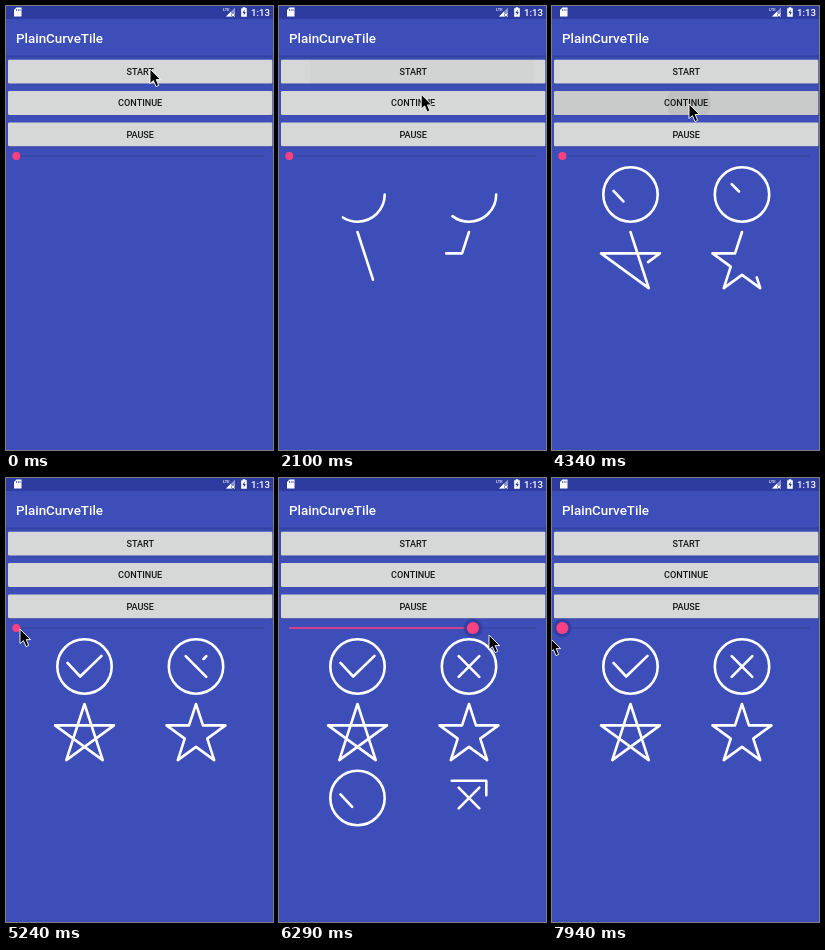
An HTML page for the animation above (8000 ms loop, 267x444 px).

```html
<!DOCTYPE html>
<html lang="en">
<head>
<meta charset="utf-8">
<title>Line drawing demo</title>
<style>
  html, body { margin: 0; width: 100%; height: 100%; overflow: hidden; background: #3d4eb8; }
  svg { display: block; width: 100%; height: 100%; }
  text { font-family: Roboto, "Noto Sans", sans-serif; font-weight: 500; }
  #buttons text { font-size: 9.1px; text-anchor: middle; fill: #151515; }
  #shapes path { fill: none; stroke: #fff; stroke-width: 2.6; stroke-linecap: round; stroke-linejoin: round; }
</style>
</head>
<body>
<svg id="stage" viewBox="0 0 267 444">
  <defs>
    <linearGradient id="shade" x2="0" y2="1">
      <stop stop-color="#2c3a92" stop-opacity=".75"/>
      <stop offset="1" stop-color="#2c3a92" stop-opacity="0"/>
    </linearGradient>
  </defs>
  <rect width="267" height="444" fill="#3d4eb8"/>
  <rect y="49.5" width="267" height="4" fill="url(#shade)"/>
  <rect width="267" height="13" fill="#2e3ca0"/>

  <g id="status" fill="#fff">
    <path d="M10.5 1.5H15.5V10.5H8V4Z"/>
    <path d="M10.5 3v2M12.3 3v2M14 3v2" stroke="#2e3ca0" stroke-width=".7"/>
    <path d="M229 1.5V10.5H220Z" fill-opacity=".45"/>
    <path d="M225 5.5V10.5H220Z"/>
    <path d="M225.5 7.5l3 3m0-3l-3 3" stroke="#fff" stroke-width=".9"/>
    <text x="217" y="5" font-size="4">LTE</text>
    <path d="M236.7 1.3h2.6v1h1.5v8.4h-5.6V2.3h1.5Z"/>
    <path d="M238.5 3.5l-2 3.4h1.3v2.6l2-3.5h-1.3Z" fill="#2e3ca0"/>
    <text x="245" y="9.8" font-size="9.6">1:13</text>
  </g>
  <text x="10" y="36.8" font-size="13.4" fill="#fff">PlainCurveTile</text>

  <g id="buttons"></g>
  <path d="M10 150H258" stroke="#3443a0"/>
  <path id="filled" stroke="#ff4081" stroke-width="1.4"/>
  <circle id="halo" cy="150" r="9.3" fill="#2f3c9c" fill-opacity=".75"/>
  <circle id="thumb" cy="150" fill="#ff4081"/>
  <g id="shapes"></g>
  <path id="cursor" d="M0 0V14.6L3.4 11.6L6 17.6L8.7 16.4L6.2 10.6H10.6Z" fill="#000" stroke="#fff" stroke-width=".9"/>
</svg>
<script>
const LOOP = 8000;
const $ = id => document.getElementById(id);
const clamp = (v, lo = 0, hi = 1) => Math.min(hi, Math.max(lo, v));

function add(parent, tag, attrs) {
  const node = document.createElementNS("http://www.w3.org/2000/svg", tag);
  set(node, attrs);
  return parent.appendChild(node);
}
function set(node, attrs) {
  for (const key in attrs) node.setAttribute(key, attrs[key]);
}

// Buttons with a press ripple; `wash` also darkens the whole button.
const buttons = [
  { label: "START", y: 53.7, press: 1650, x: 143, wash: 0 },
  { label: "CONTINUE", y: 85.1, press: 4340, x: 137, wash: .06 },
  { label: "PAUSE", y: 116.4, press: 2990, x: 141, wash: .06 }
].map((b, i) => {
  const group = $("buttons");
  const box = { x: 2, y: b.y, width: 264.3, height: 23.8, rx: 1.2 };
  add(add($("stage"), "clipPath", { id: "clip" + i }), "rect", box);
  add(group, "rect", { ...box, y: b.y + .7, fill: "#2c3a92", "fill-opacity": .6 });
  add(group, "rect", { ...box, fill: "#d6d7d7" });
  const wash = add(group, "rect", box);
  const ripple = add(group, "circle", { cx: b.x, cy: b.y + 12, "clip-path": `url(#clip${i})` });
  add(group, "text", { x: 134.2, y: b.y + 15.3 }).textContent = b.label;
  return { ...b, wash, ripple, depth: b.wash };
});

// Path builders, all centred on (x, y)
const poly = (points, close) =>
  "M" + points.map(p => p.map(v => v.toFixed(2)).join(" ")).join("L") + (close ? "Z" : "");
const circle = (x, y, r = 27.2) => `M${x + r} ${y}A${r} ${r} 0 1 1 ${x - r} ${y}A${r} ${r} 0 1 1 ${x + r} ${y}`;
const tick = (x, y) => poly([[x - 17, y - 3.6], [x - 4.3, y + 10], [x + 17, y - 10.6]]);
const slash = (x, y, side) => poly([[x - 10.3 * side, y - 10.3], [x + 10.3 * side, y + 10.3]]);
const square = (x, y, h = 17.3) => poly([[x - h, y - h], [x + h, y - h], [x + h, y + h], [x - h, y + h]], true);
function star(x, y, count, turn, inner) {
  return poly(Array.from({ length: count }, (_, i) => {
    const r = i % 2 ? 31 * inner : 31, a = -Math.PI / 2 - i * turn;
    return [x + r * Math.cos(a), y + r * Math.sin(a)];
  }), true);
}

const LEFT = 78.5, RIGHT = 190;
const strokes = [];
// Each stroke is drawn while the chosen progress goes from `from` to `to`.
function stroke(d, source, from, to) {
  strokes.push({ node: add($("shapes"), "path", { d, pathLength: 1 }), source, from, to });
}
stroke(circle(LEFT, 188.5), "elapsed", 0, 1000);
stroke(tick(LEFT, 188.5), "elapsed", 1000, 2000);
stroke(circle(RIGHT, 188.5), "elapsed", 0, 960);
stroke(slash(RIGHT, 188.5, 1), "elapsed", 960, 1920);
stroke(slash(RIGHT, 188.5, -1), "elapsed", 1920, 2880);
stroke(star(LEFT, 257, 5, Math.PI * 4 / 5 * -1, 1), "elapsed", 0, 2000);
stroke(star(RIGHT, 257, 10, Math.PI / 5, .382), "elapsed", 0, 2000);
stroke(circle(LEFT, 320), "slider", 0, .6);
stroke(tick(LEFT, 320), "slider", .6, 1);
stroke(slash(RIGHT, 320, 1), "slider", 0, .3);
stroke(slash(RIGHT, 320, -1), "slider", .3, .6);
stroke(square(RIGHT, 320), "slider", .6, 1);

const cursorKeys = [
  [0, 144, 63], [1499, 144, 63], [1500, 143, 63], [1800, 143, 64], [2540, 141, 124], [2690, 141, 126],
  [3140, 141, 126], [3590, 137, 98], [4490, 137, 98], [5240, 14, 151], [5390, 17, 151],
  [6290, 210, 157], [6440, 240, 158], [6590, 262, 160], [6890, 262, 160], [7940, -2, 160]
];
const sliderKeys = [
  [5390, 0], [5540, .07], [6290, .742], [6440, .87], [6590, 1], [6890, 1], [7790, .08], [7940, 0]
];
function track(keys, t) {
  const i = keys.findIndex(k => k[0] > t);
  if (i === 0) return keys[0].slice(1);
  if (i < 0) return keys[keys.length - 1].slice(1);
  const a = keys[i - 1], b = keys[i], f = (t - a[0]) / (b[0] - a[0]);
  return a.slice(1).map((v, n) => v + (b[n + 1] - v) * f);
}

function draw(time) {
  // The picture advances in steps of 150 ms.
  const shift = time < 2540 ? 0 : 140;
  const t = time >= 2400 && time < 2540 ? 2400 : Math.floor((time - shift) / 150) * 150 + shift;

  const [slider] = track(sliderKeys, t);
  const elapsed = clamp(t - 1760, 0, 1300) + Math.max(0, t - 4490);
  const progress = { elapsed, slider };
  for (const s of strokes) {
    const p = clamp((progress[s.source] - s.from) / (s.to - s.from));
    set(s.node, {
      visibility: p > 0 ? "visible" : "hidden",
      "stroke-dasharray": p < 1 ? `${p} 2` : "none"
    });
  }

  for (const b of buttons) {
    const age = t - b.press;
    const fade = age < 0 ? 0 : clamp((600 - age) / 350);
    set(b.wash, { "fill-opacity": b.depth * fade });
    set(b.ripple, { r: 22 + Math.max(0, age) * .2, "fill-opacity": .05 * fade });
  }

  const x = 10.3 + slider * 247.5;
  const pressed = t >= 5540;
  set($("filled"), { d: `M10 150H${x}`, visibility: slider > 0 ? "visible" : "hidden" });
  set($("halo"), { cx: x, visibility: pressed ? "visible" : "hidden" });
  set($("thumb"), { cx: x, r: pressed ? 6 : 4 });
  set($("cursor"), { transform: `translate(${track(cursorKeys, t).join(" ")})` });
}

const start = performance.now();
function tickFrame() {
  draw((performance.now() - start) % LOOP);
  requestAnimationFrame(tickFrame);
}
tickFrame();
</script>
</body>
</html>
```
